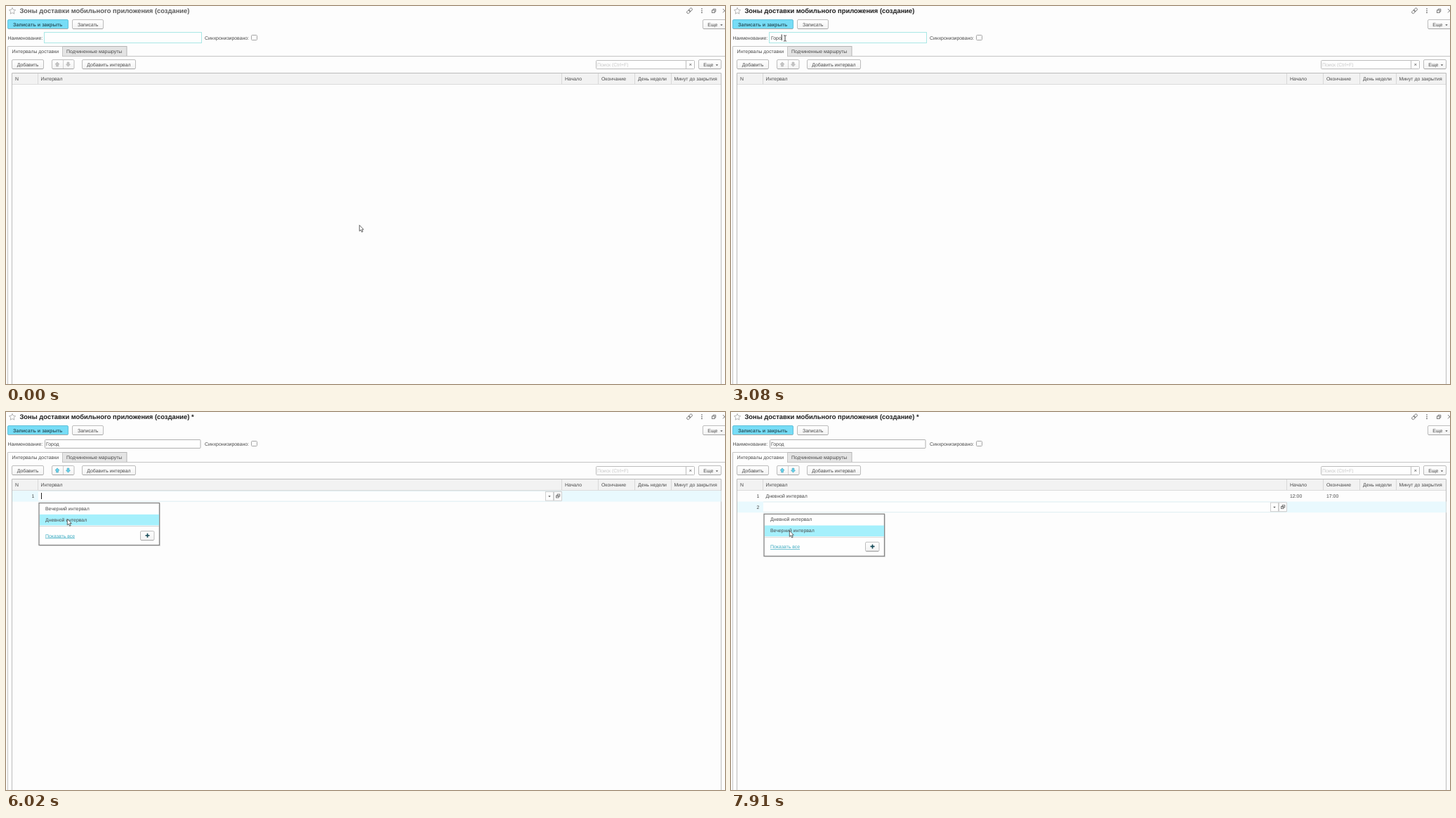
Animation, 1024 px wide and 538 px high, one loop 8000 ms. Source, as an HTML page:

```html
<!DOCTYPE html>
<html lang="ru">
<head>
<meta charset="utf-8">
<title>Зоны доставки</title>
<style>
html, body { margin: 0; width: 100%; height: 100%; overflow: hidden; background: #fdfdfd; }
svg { display: block; width: 1024px; height: 538px; }
text { font: 6.9px "Liberation Sans", Arial, sans-serif; fill: #484848; text-rendering: geometricPrecision; white-space: pre; }
.title { font-size: 9.4px; font-weight: bold; fill: #1c1c1c; }
.bold { font-size: 7.1px; font-weight: bold; fill: #2c5a66; }
.hint { fill: #c6c6c6; }
.link { fill: #38a9c0; text-decoration: underline; }
.icon { fill: none; stroke: #707070; stroke-width: .9; }
</style>
</head>
<body>
<svg id="stage" viewBox="0 0 1024 538" xmlns="http://www.w3.org/2000/svg"></svg>
<script>
const LOOP = 8000, FIRST = 140, STEP = 210;

const text = (x, mid, s, cls = '', extra = '') =>
  `<text x="${x}" y="${mid + 2.5}" class="${cls}" ${extra}>${s}</text>`;
const box = (x, y, w, h, fill = 'none', stroke = 'none', extra = '') =>
  `<rect x="${x}" y="${y}" width="${w}" height="${h}" fill="${fill}" stroke="${stroke}" ${extra}/>`;
const path = (d, stroke = '#c8c8c8', fill = 'none', extra = '') =>
  `<path d="${d}" stroke="${stroke}" fill="${fill}" ${extra}/>`;
const button = (x, y, w, fill = 'url(#face)', stroke = '#bcbcbc') =>
  box(x, y, w, 13, fill, stroke, 'rx="1.5"') +
  path(`M${x + 1} ${y + 13}h${w - 2}`, '#a6a6a6');
const drop = (x, y) => path(`M${x - 1.7} ${y - .8}h3.4l-1.7 2z`, 'none', '#555');
// "a-b c-d": the group is visible in these spans of the loop
const during = (spans, body) => `<g data-on="${spans}">${body}</g>`;

const moveArrows = (fill, stroke) =>
  path('M73 79.8l3 3.2h-1.6v3h-2.8v-3h-1.6z', stroke, fill, 'stroke-width=".6"') +
  path('M88.5 86.2l3-3.2h-1.6v-3h-2.8v3h-1.6z', stroke, fill, 'stroke-width=".6"');

const textCaret = y => path(`M50.5 ${y}v9`, '#222');
const currentRow = y => box(9, y, 1009.5, 15.6, '#e9f9fe');

const editor = y =>
  currentRow(y) + box(46, y + .5, 745.5, 14.6, '#fefefe') +
  path(`M46 ${y + .5}H791M46 ${y + 15.1}H791`, '#e0eef2') +
  box(768.5, y + 1.5, 11, 12.6, '#fdfdfd', '#d0d0d0') +
  box(780.5, y + 1.5, 11, 12.6, '#fdfdfd', '#d0d0d0') + drop(774, y + 8) +
  `<g class="icon"><rect x="783.5" y="${y + 7}" width="3.6" height="3"/><rect x="785.2" y="${y + 5}" width="3.6" height="3"/></g>`;

const popup = (y, items) =>
  box(48, y + 1, 172, 61, '#000', 'none', 'opacity=".1"') +
  box(47, y + .5, 171.5, 60, '#fefefe', '#858585', 'stroke-width="1.3"') +
  items.map((s, i) =>
    box(48, y + 1 + i * 15.8, 170, 15.5, '#a5f0fc', 'none', `data-hover="${y + 1 + i * 15.8}"`) +
    text(56, y + 8.2 + i * 15.8, s)).join('') +
  path(`M48 ${y + 33.5}H218`, '#d4d4d4') +
  text(56, y + 47, 'Показать все', 'link') +
  button(191.5, y + 40.5, 19.5) +
  path(`M198.5 ${y + 46.7}h6m-3-3v6`, '#164b58', 'none', 'stroke-width="1.6"');

const filledRow =
  text(36.5, 119.8, '1') + text(49.5, 119.8, 'Дневной интервал') +
  text(796, 119.8, '12:00') + text(848, 119.8, '17:00');

const columns = [[13, 'N'], [49.5, 'Интервал'], [796, 'Начало'], [848, 'Окончание'],
  [900, 'День недели'], [951.5, 'Минут до закрытия']];

const header =
  path('M9 2.4l1.4 3 3.2.4-2.4 2.2.6 3.2L9 9.6l-2.8 1.6.6-3.2L4.4 5.8l3.2-.4z', '#a4a4a4', 'none', 'stroke-width=".8"') +
  text(19.5, 7.6, 'Зоны доставки мобильного приложения (создание)<tspan id="star"> *</tspan>', 'title', 'id="title"') +
  `<g class="icon">
    <g transform="rotate(-45 973.5 6.8)"><rect x="968.8" y="5" width="5.4" height="3.6" rx="1.8"/><rect x="972.8" y="5" width="5.4" height="3.6" rx="1.8"/></g>
    <rect x="1005.5" y="6" width="3.8" height="3.6"/><path d="M1007 6V4.3h3.8v3.6h-1.5M1021 4l5 5.5m0-5.5l-5 5.5"/>
  </g>` +
  [4, 6.7, 9.4].map(y => `<circle cx="991" cy="${y}" r=".8" fill="#555"/>`).join('') +
  button(2.5, 19.5, 86, '#76dcf6', '#62c2da') + text(10, 26.3, 'Записать и закрыть', 'bold') +
  button(94.5, 19.5, 44) + text(102, 26.3, 'Записать') +
  button(992.5, 19.5, 36) + text(999.3, 26.3, 'Еще') + drop(1019, 27) +
  text(2.5, 45, 'Наименование:') +
  during('0-4760', box(54.5, 37.5, 224, 15, '#fefefe', '#a9e8e6')) +
  during('4760-8000', box(55.5, 39.5, 221.5, 12, '#fefefe', '#b0b0b0', 'rx="1"')) +
  text(57, 45, '', '', 'id="name"') +
  path('M0 40.5v8.5', '#222', 'none', 'id="caret" stroke-width=".9"') +
  text(283, 45, 'Синхронизировано:') + box(349.5, 41.5, 8, 7, '#fefefe', '#a4a4a4', 'rx="1"');

const panel =
  box(80.5, 57.5, 91.5, 14, '#e4e4e4', '#b4b4b4') +
  path('M2.5 538V57.5H80.5V71.5H1024', '#c4c4c4') +
  text(8.5, 64.2, 'Интервалы доставки') + text(86, 64.2, 'Подчиненные маршруты') +
  button(8.5, 76.5, 45) + box(8.5, 76.5, 45, 13, 'none', '#929292', 'rx="1.5" id="focus"') +
  text(15.8, 83.4, 'Добавить') +
  button(65.5, 76.5, 31.5) + path('M81.5 77v12', '#d0d0d0') +
  during('0-4760', moveArrows('#c4c4c4', '#b0b0b0')) +
  during('4760-8000', moveArrows('#62d3ee', '#4a9db2')) +
  button(108.5, 76.5, 76) + text(115.3, 83.4, 'Добавить интервал') +
  box(840.5, 77.5, 140, 12, '#fefefe', '#bcbcbc', 'rx="1"') + path('M968.5 77.5v12', '#bcbcbc') +
  text(842, 83.4, 'Поиск (Ctrl+F)', 'hint') +
  path('M973.4 82l2.8 2.8m0-2.8l-2.8 2.8', '#666', 'none', 'stroke-width=".9"') +
  button(986.5, 76.5, 32) + text(993.3, 83.4, 'Еще') + drop(1012.5, 84);

const table =
  box(9, 96, 1009, 15.5, '#f2f2f2') +
  path('M8.5 538V95.5H1018.5V538', '#bcbcbc') + path('M9 111.5H1018', '#dcdcdc') +
  path([45.5, 791.5, 843.5, 895.5, 947.5].map(x => `M${x} 96v15`).join(''), '#d8d8d8') +
  columns.map(([x, s]) => text(x, 103.5, s)).join('');

const rows =
  during('4760-6230', editor(112) + text(36.5, 119.8, '1') + popup(129, ['Вечерний интервал', 'Дневной интервал'])) +
  during('4760-5180 5600-6230', textCaret(115)) +
  during('6230-7280', currentRow(112) + box(896, 112.5, 51.5, 14.8, '#fefefe') +
    box(938.5, 115.3, 4.4, 9, '#34505c') + text(938.8, 119.8, '0', '', 'style="fill:#fff"')) +
  during('6230-8000', filledRow) +
  during('7280-8000', editor(127.5) + text(36.5, 135.4, '2') + popup(144.7, ['Дневной интервал', 'Вечерний интервал'])) +
  during('7280-7700', textCaret(130.5));

const pointers =
  path('M.3.3v8.6l2-1.8 1.4 3.2 1.5-.7-1.4-3h2.5z', '#555', '#fff', 'id="arrow" stroke-width=".9"') +
  path('M-2-4h1.4l.6.6.6-.6H2M0-3.4v6.8M-2 4h1.4l.6-.6.6.6H2', '#333', 'none', 'id="beam" stroke-width=".9"');

const stage = document.getElementById('stage');
stage.innerHTML =
  `<defs><linearGradient id="face" x2="0" y2="1"><stop stop-color="#fff"/><stop offset="1" stop-color="#f2f2f2"/></linearGradient></defs>` +
  box(0, 0, 1024, 538, '#fdfdfd') + header + panel + table + rows + pointers;

const $ = id => document.getElementById(id);
const show = (el, on) => { el.style.display = on ? '' : 'none'; };
const inSpans = (spans, t) => spans.split(' ').some(s => {
  const [a, b] = s.split('-').map(Number);
  return t >= a && t < b;
});
const timed = [...stage.querySelectorAll('[data-on]')];
const hovers = [...stage.querySelectorAll('[data-hover]')];

// pointer moves: start, end, target
const moves = [[0, 980, 77, 46], [3710, 4550, 46, 83], [4760, 5810, 87, 152],
  [6230, 6860, 37, 86.5], [7070, 7700, 83, 168.5]];

function pointerAt(t) {
  let x = 503, y = 311.5;
  for (const [a, b, tx, ty] of moves) {
    const k = Math.min(1, Math.max(0, (t - a) / (b - a))), e = k * k * (3 - 2 * k);
    x += (tx - x) * e;
    y += (ty - y) * e;
  }
  return [x, y];
}

function render(t) {
  timed.forEach(el => show(el, inSpans(el.dataset.on, t)));
  $('title').style.fill = t < FIRST ? '#5c5c5c' : '';
  show($('star'), t >= 4760);

  const name = $('name'), typed = Math.max(0, Math.floor((t - 2450) / STEP) + 1);
  name.textContent = 'Город'.slice(0, typed);
  show($('caret'), inSpans('2450-3920 4340-4760', t));
  $('caret').setAttribute('transform', `translate(${57.4 + (typed ? name.getComputedTextLength() : 0)} 0)`);

  const [x, y] = pointerAt(t);
  const overField = x > 54 && x < 279 && y > 38 && y < 52;
  show($('beam'), overField);
  show($('arrow'), !overField);
  $(overField ? 'beam' : 'arrow').setAttribute('transform', `translate(${x} ${y})`);
  show($('focus'), x > 8 && x < 54 && y > 77 && y < 90);
  hovers.forEach(el => {
    const top = +el.dataset.hover;
    show(el, x > 47 && y >= top && y < top + 15.8);
  });
}

let last = -1;
function tick() {
  const now = performance.now() % LOOP;
  const t = now < FIRST ? 0 : FIRST + Math.floor((now - FIRST) / STEP) * STEP;
  if (t !== last) render(last = t);
  requestAnimationFrame(tick);
}
tick();
</script>
</body>
</html>
```
